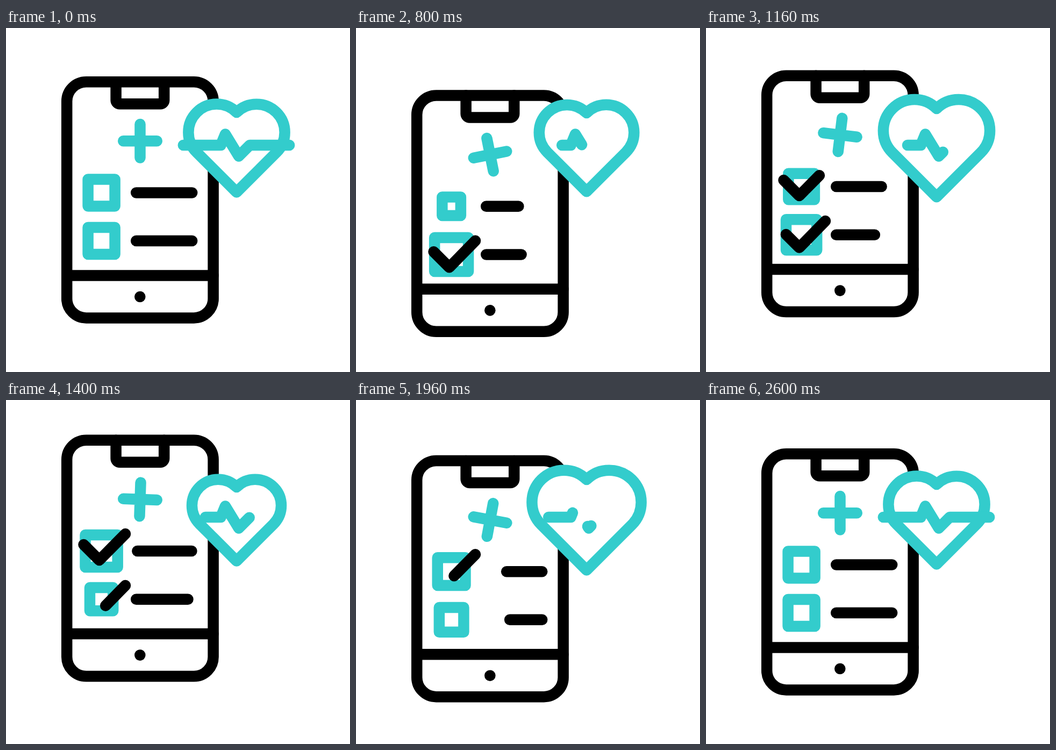
An HTML page that plays this animation: 640 px wide and 640 px high, repeating every 3000 ms.

```html
<!DOCTYPE html>
<html lang="en">
<head>
<meta charset="utf-8">
<title>Health checklist</title>
<style>
  html, body { margin: 0; width: 100%; height: 100%; overflow: hidden; background: #fff; }
  svg { display: block; width: 100%; height: 100%; }
  svg * { fill: none; stroke: #000; stroke-width: 20.5; stroke-linecap: round; stroke-linejoin: round; }
  .teal, .teal * { stroke: #33cccc; }
  #heart { fill: #fff; }
  #dot { fill: #000; stroke: none; }
</style>
</head>
<body>
<svg viewBox="0 0 640 640">
  <g id="phone">
    <rect x="113.2" y="100.2" width="272.4" height="439.2" rx="36"/>
    <path d="M113.2 460.4H385.6M204.6 100.2V134.2a7 7 0 0 0 7 7H287.2a7 7 0 0 0 7-7V100.2"/>
    <circle id="dot" cx="249.3" cy="500" r="10.3"/>
    <path id="plus" class="teal" d="M218.2 210.3H280.8M249.5 179V241.6"/>
    <path id="box0" class="teal"/>
    <path id="box1" class="teal"/>
    <path id="line0"/>
    <path id="line1"/>
    <path id="check0" d="M144.5 294.5l29 29L222 274.5"/>
    <path id="check1" d="M144.5 391l29 29L222 370.5"/>
  </g>
  <g class="teal">
    <path id="heart"/>
    <path id="pulse0"/>
    <path id="pulse1"/>
    <path id="pulse2"/>
  </g>
</svg>
<script>
const LOOP = 3000, STEP = 40, START = 240, END = 2600;
const $ = id => document.getElementById(id);
const ease = u => (1 - Math.cos(Math.PI * u)) / 2;

// Eases through evenly spaced poses, holding the first and the last.
function swing(t, start, step, ...poses) {
  const last = poses.length - 1;
  const u = Math.min(Math.max((t - start) / step, 0), last);
  const i = Math.min(Math.floor(u), last - 1);
  return poses[i] + (poses[i + 1] - poses[i]) * ease(u - i);
}

// Shows only the stretch of a path between two distances.
function trim(el, a, b) {
  el.style.display = b - a > .2 ? "" : "none";
  el.style.strokeDasharray = `${Math.max(b - a, 0)} 999`;
  el.style.strokeDashoffset = -a;
}

// A square on its corner with half discs on the two upper sides.
function heartPath(s) {
  const cx = 429, cy = 223.6, x = 74.25 * s, r = 52.5 * s;
  const top = cy - 66.6 * s, mid = cy + 7.65 * s, tip = cy + 81.9 * s;
  return `M${cx} ${top}A${r} ${r} 0 0 0 ${cx - x} ${mid}L${cx} ${tip}` +
    `L${cx + x} ${mid}A${r} ${r} 0 0 0 ${cx} ${top}Z`;
}

const rows = [
  { y: 306.4, box: 165, low: .69, high: 1.22, shrink: 193, slide: 1330, tick: 806, wipe: 1635 },
  { y: 396.1, box: 275, low: 1.285, high: .77, shrink: 313, slide: 1410, tick: 170, wipe: 1060 }
];

function drawRow(r, i, t) {
  const h = 25 * swing(t, r.box, 655, 1, r.low, r.high, 1);
  $("box" + i).setAttribute("d", `M${177.6 - h} ${r.y - h}h${2 * h}v${2 * h}h${-2 * h}Z`);

  const left = 242.2 + swing(t, r.slide, 500, 0, 45, 0);
  const right = 346.2 - swing(t, r.shrink, 630, 0, 44, 0);
  $("line" + i).setAttribute("d", `M${left} ${r.y}H${right}`);

  const check = $("check" + i), len = check.getTotalLength();
  trim(check, len * swing(t, r.wipe, 660, 0, 1), len * swing(t, r.tick, 470, 0, 1));
}

const pulses = [0, 1, 2].map(i => $("pulse" + i));
for (const p of pulses) p.setAttribute("d", "M329.8 218H399.6L408 197.5L433 238.5L453.5 218H527.2");
const pulseLen = pulses[0].getTotalLength();

// The visible stretch runs on past the end of the line to its beginning;
// a second one grows from the dip.
function drawPulse(t) {
  const dip = 136;
  const head = swing(t, 190, 600, 0, 296, 284) + swing(t, 1390, 300, 0, -52, -12, pulseLen - 284);
  const tail = swing(t, 190, 600, 0, 115, 168) + swing(t, 1390, 300, 0, -66, -90, -70, dip - 168);
  trim(pulses[0], head, pulseLen);
  trim(pulses[1], Math.max(head - pulseLen, 0), tail);
  trim(pulses[2], dip, swing(t, 1850, 550, dip, pulseLen));
}

function draw(t) {
  const y = swing(t, 172, 600, 0, 25.6, -25.6, 12.8, 0);
  const turn = swing(t, 400, 400, 0, -11.3, 7.4, -3.6, 10.8, 0);
  const beat = swing(t, 150, 455, 1, .89, 1.134, .89, 1.134, 1);
  $("phone").setAttribute("transform", `translate(0 ${y})`);
  $("plus").setAttribute("transform", `rotate(${turn} 249.5 210.3)`);
  $("heart").setAttribute("d", heartPath(beat));
  rows.forEach((r, i) => drawRow(r, i, t));
  drawPulse(t);
}

function tick() {
  const t = Math.floor(performance.now() % LOOP / STEP) * STEP;
  draw(t < START || t >= END ? 0 : t);
  requestAnimationFrame(tick);
}
tick();
</script>
</body>
</html>
```
